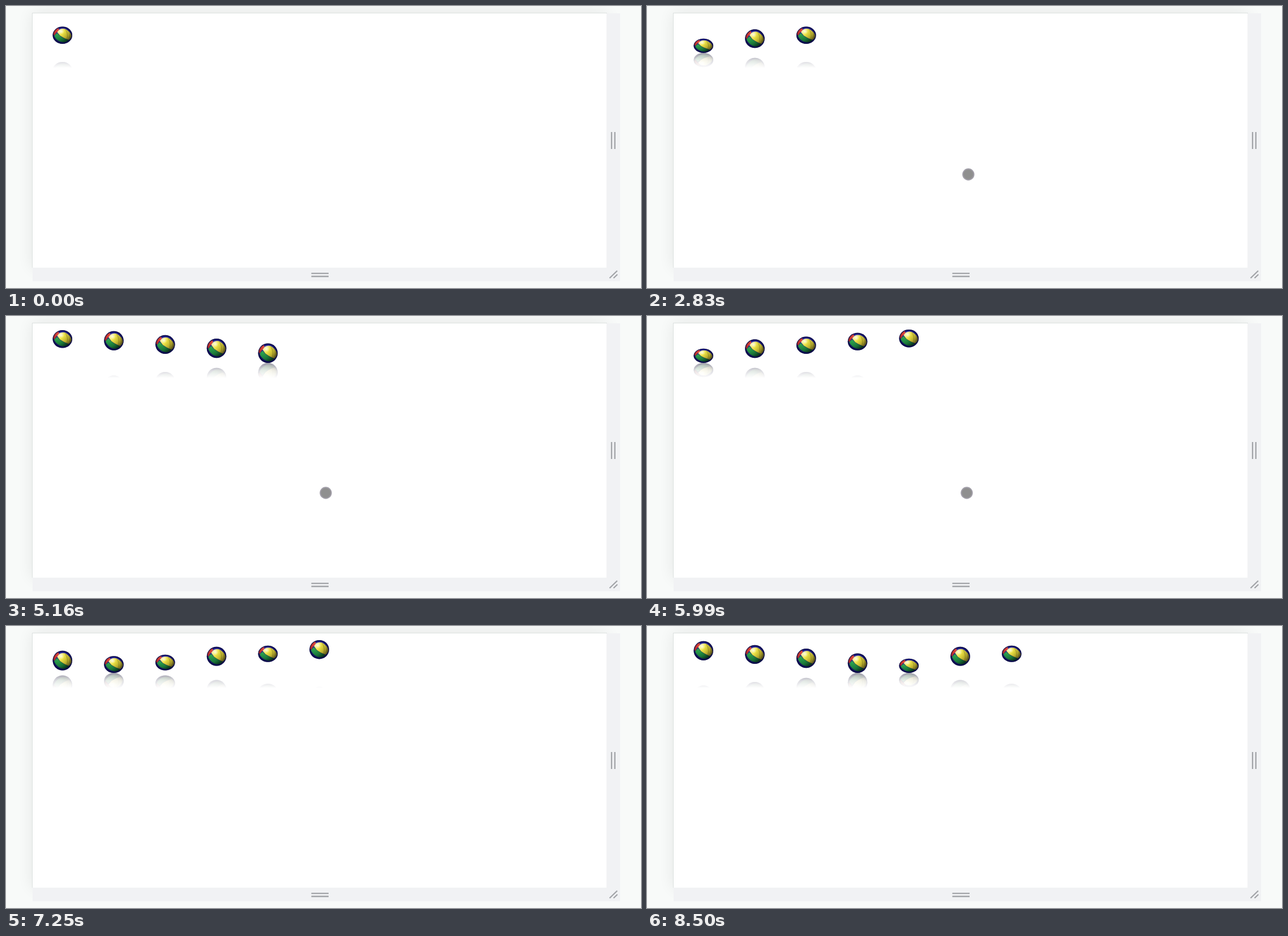
Write an HTML page with a canvas that moves like this. It is 1122x499 px and loops after 8570 ms.

```html
<!DOCTYPE html>
<html lang="en">
<head>
<meta charset="utf-8">
<title>Bouncing balls</title>
<style>
  html, body { margin: 0; width: 100%; height: 100%; overflow: hidden; background: #f8faf9; }
  canvas { display: block; position: absolute; left: 0; top: 0; }
</style>
</head>
<body>
<canvas id="stage" width="1122" height="499"></canvas>
<script>
const LOOP = 8570;
const TICK = 10;
const FLOOR = 83;
const FADE_END = 110;
const RADIUS_X = 17.3;

// One bounce: 18 steps in the air, 2 on the floor.
const STEP_MS = 78.5;
const AIR_STEPS = 18;
const BOUNCE_STEPS = 20;
const RISE = 27.5;
const FIRST_STEP = 4.65;

const BALLS = 7;
const FIRST_X = 99.8;
const SPACING = 90.75;
const LEAD_STEPS = 2.0145;
const FIRST_BORN = -600;
const BORN_EVERY = 1413;

// Time, x and y of the pointer's turns.
const POINTER = [
  [300, 650, 449], [480, 571, 294], [1600, 571, 294], [2800, 568, 297],
  [3300, 565, 313], [6480, 565, 313], [6680, 706, 468]
];

const ctx = document.getElementById('stage').getContext('2d');
const mirror = document.createElement('canvas');
mirror.width = 1122;
mirror.height = FADE_END - FLOOR;
const mctx = mirror.getContext('2d');

function withStops(gradient, ...colors) {
  colors.forEach((color, i) => gradient.addColorStop(i / (colors.length - 1), color));
  return gradient;
}

const fill = {
  base: withStops(ctx.createRadialGradient(0.15, -0.6, 0, 0, 0, 1), '#4a4ad8', '#2626a6', '#12126c'),
  yellow: withStops(ctx.createLinearGradient(-0.5, -0.6, 0.9, 0.45), '#f8f4a4', '#f2e84a', '#c6ba2e', '#706818'),
  red: withStops(ctx.createLinearGradient(-0.4, -0.7, -0.9, 0), '#f04a3c', '#cc302c'),
  green: withStops(ctx.createLinearGradient(-0.6, 0, 0.4, 0.9), '#2ca650', '#1d843c', '#0b3a1a'),
  shade: withStops(ctx.createRadialGradient(-0.2, -0.35, 0.2, 0, 0, 1),
    'rgba(0,0,20,0)', 'rgba(0,0,20,.03)', 'rgba(0,0,20,.12)', 'rgba(0,0,30,.55)'),
  glow: withStops(ctx.createRadialGradient(-0.15, -0.45, 0, -0.15, -0.45, 0.36),
    'rgba(255,255,255,.8)', 'rgba(255,255,255,0)'),
  fade: withStops(mctx.createLinearGradient(0, 0, 0, mirror.height),
    'rgba(0,0,0,.42)', 'rgba(0,0,0,.15)', 'rgba(0,0,0,0)')
};

const panels = {
  yellow: new Path2D('M-.55-.38Q-.2-.9.3-.72Q.85-.4.94.08Q.85.45.62.55Q.1.35-.25.06Z'),
  red: new Path2D('M-.95-.12Q-.88-.6-.42-.84Q-.3-.62-.45-.5Q-.72-.25-.82.04Z'),
  green: new Path2D('M-.86.08Q-.72-.12-.54-.26Q-.2.28.66.57Q.45.82.1.85Q-.55.76-.86.08Z')
};
const seams = new Path2D('M-.54-.28Q-.15.28.66.55M.28-.7Q.62-.2.45.45');
const disc = new Path2D();
disc.arc(0, 0, 1, 0, Math.PI * 2);

// The ball leaves the floor squashed, wobbles on the way up and falls round.
function pose(step) {
  const onFloor = step >= AIR_STEPS;
  const u = Math.abs(step * 2 / AIR_STEPS - 1);
  const bottom = onFloor ? FLOOR : FLOOR - RISE * (1 - u ** 1.5);
  const wobble = 5 * Math.exp(-step / 7) * Math.cos(2 * Math.PI * (step - 0.25) / 4.75);
  const height = onFloor ? 34.5 - 4.75 * (step - AIR_STEPS) : 30 + 0.26 * step - wobble;
  return { top: bottom - height, bottom };
}

function ballsAt(t) {
  return Array.from({ length: BALLS }, (_, i) => {
    const step = Math.floor(t / STEP_MS + FIRST_STEP + i * LEAD_STEPS) % BOUNCE_STEPS;
    return { x: FIRST_X + i * SPACING, born: FIRST_BORN + i * BORN_EVERY, ...pose(step) };
  }).filter(ball => ball.born <= t);
}

function drawBall(c, x, top, bottom, flip) {
  c.save();
  c.translate(x, (top + bottom) / 2);
  c.scale(RADIUS_X, (bottom - top) / 2 * flip);
  c.fillStyle = fill.base;
  c.fill(disc);
  for (const color in panels) {
    c.fillStyle = fill[color];
    c.fill(panels[color]);
  }
  c.lineWidth = 0.035;
  c.strokeStyle = 'rgba(40,40,10,.45)';
  c.stroke(seams);
  for (const name of ['glow', 'shade']) {
    c.fillStyle = fill[name];
    c.fill(disc);
  }
  c.restore();
}

function drawMirror(balls) {
  mctx.clearRect(0, 0, mirror.width, mirror.height);
  for (const { x, top, bottom } of balls) {
    drawBall(mctx, x, FLOOR - bottom, FLOOR - top, -1);
  }
  mctx.globalCompositeOperation = 'destination-in';
  mctx.fillStyle = fill.fade;
  mctx.fillRect(0, 0, mirror.width, mirror.height);
  mctx.globalCompositeOperation = 'source-over';
  ctx.filter = 'saturate(.5)';
  ctx.drawImage(mirror, 0, FLOOR);
  ctx.filter = 'none';
}

function drawPage() {
  ctx.fillStyle = '#f8faf9';
  ctx.fillRect(0, 0, 1122, 499);
  ctx.save();
  ctx.shadowColor = 'rgba(0,0,0,.09)';
  ctx.shadowBlur = 26;
  ctx.fillStyle = '#fff';
  ctx.fillRect(47, 13, 1014, 450);
  ctx.restore();
  ctx.fillStyle = '#f1f2f4';
  ctx.fillRect(1061, 13, 24, 474);
  ctx.fillRect(47, 463, 1038, 24);
  ctx.fillStyle = '#dce1df';
  ctx.fillRect(46, 12, 1016, 1);
  ctx.fillRect(46, 12, 1, 451);

  ctx.strokeStyle = '#a2a4a8';
  ctx.lineWidth = 2.3;
  ctx.stroke(new Path2D('M1070 223V253M1075.8 223V253M539.5 473.2H570M539.5 478.5H570M1066.5 481.5L1080 468.5M1073.5 481.5L1080.3 475'));
}

function drawPointer(t) {
  const next = POINTER.findIndex(([at]) => at > t);
  if (next < 1) return;
  const [t0, x0, y0] = POINTER[next - 1];
  const [t1, x1, y1] = POINTER[next];
  const k = (t - t0) / (t1 - t0);
  ctx.beginPath();
  ctx.arc(x0 + (x1 - x0) * k, y0 + (y1 - y0) * k, 9.7, 0, Math.PI * 2);
  ctx.fillStyle = '#8f8f8f';
  ctx.fill();
  ctx.lineWidth = 2;
  ctx.strokeStyle = '#a19ea8';
  ctx.stroke();
}

function draw(t) {
  const balls = ballsAt(t);
  drawPage();
  drawMirror(balls);
  balls.forEach(({ x, top, bottom }) => drawBall(ctx, x, top, bottom, 1));
  drawPointer(t);
}

const begin = performance.now();
function frame() {
  const elapsed = Math.round((performance.now() - begin) / TICK) * TICK;
  draw(elapsed % LOOP);
  requestAnimationFrame(frame);
}
frame();
</script>
</body>
</html>
```
